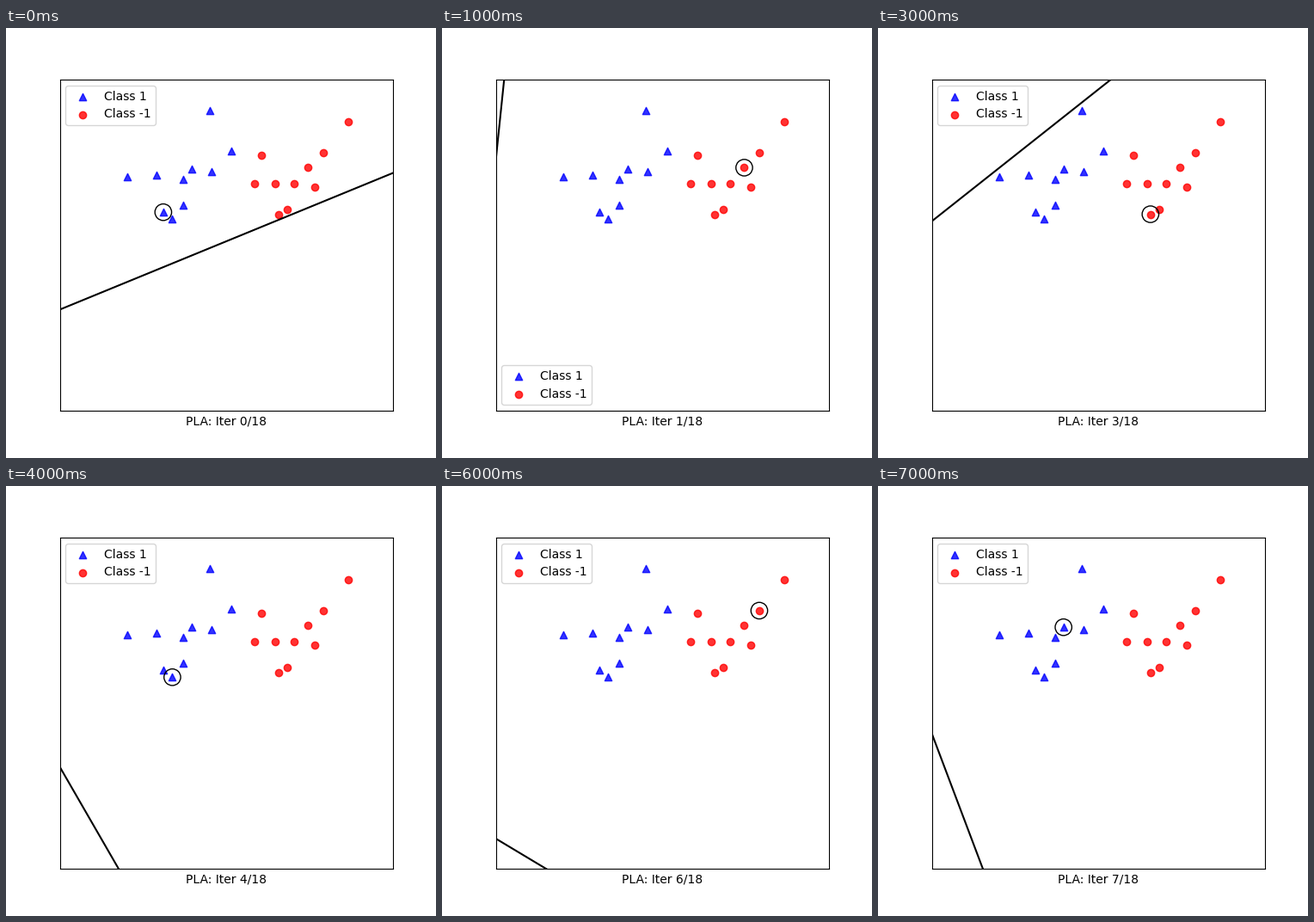
A matplotlib script for the animation above (8000 ms loop, 500 px wide and 500 px high).

```python
import matplotlib.pyplot as plt
import numpy as np
from matplotlib.animation import FuncAnimation

N = 10
STEPS_SHOWN = 8
X_LIM, Y_LIM = (0, 6), (-2, 4)

np.random.seed(2)
cov = [[0.3, 0.2], [0.2, 0.3]]
blue = np.random.multivariate_normal([2, 2], cov, N)
red = np.random.multivariate_normal([4, 2], cov, N)
points = np.column_stack([np.ones(2 * N), np.vstack([blue, red])])
labels = np.repeat([1, -1], N)


def perceptron(w):
    """Return every weight vector and the misclassified point that changed it."""
    weights, mistakes = [w], []
    while True:
        for k in np.random.permutation(2 * N):
            if np.sign(w @ points[k]) != labels[k]:
                mistakes.append(k)
                w = w + labels[k] * points[k]
                weights.append(w)
        if np.array_equal(np.sign(points @ w), labels):
            return weights, mistakes


weights, mistakes = perceptron(np.random.randn(3))

fig, ax = plt.subplots(figsize=(5, 5), dpi=100)


def draw(i):
    w0, w1, w2 = weights[i]
    ax.clear()
    ax.scatter(*blue.T, c="blue", marker="^", alpha=0.8, label="Class 1")
    ax.scatter(*red.T, c="red", marker="o", alpha=0.8, label="Class -1")
    x = np.array([-100, 100])
    ax.plot(x, -(w0 + w1 * x) / w2, color="black")
    ax.add_patch(plt.Circle(points[mistakes[i], 1:], 0.15, color="black",
                            fill=False))
    ax.set(xlim=X_LIM, ylim=Y_LIM, xticks=[], yticks=[],
           xlabel=f"PLA: Iter {i}/{len(mistakes)}")
    ax.legend(loc="best")
    return ax.get_children()


anim = FuncAnimation(fig, draw, frames=STEPS_SHOWN, init_func=lambda: draw(0),
                     interval=1000, repeat=True)
plt.show()
```
